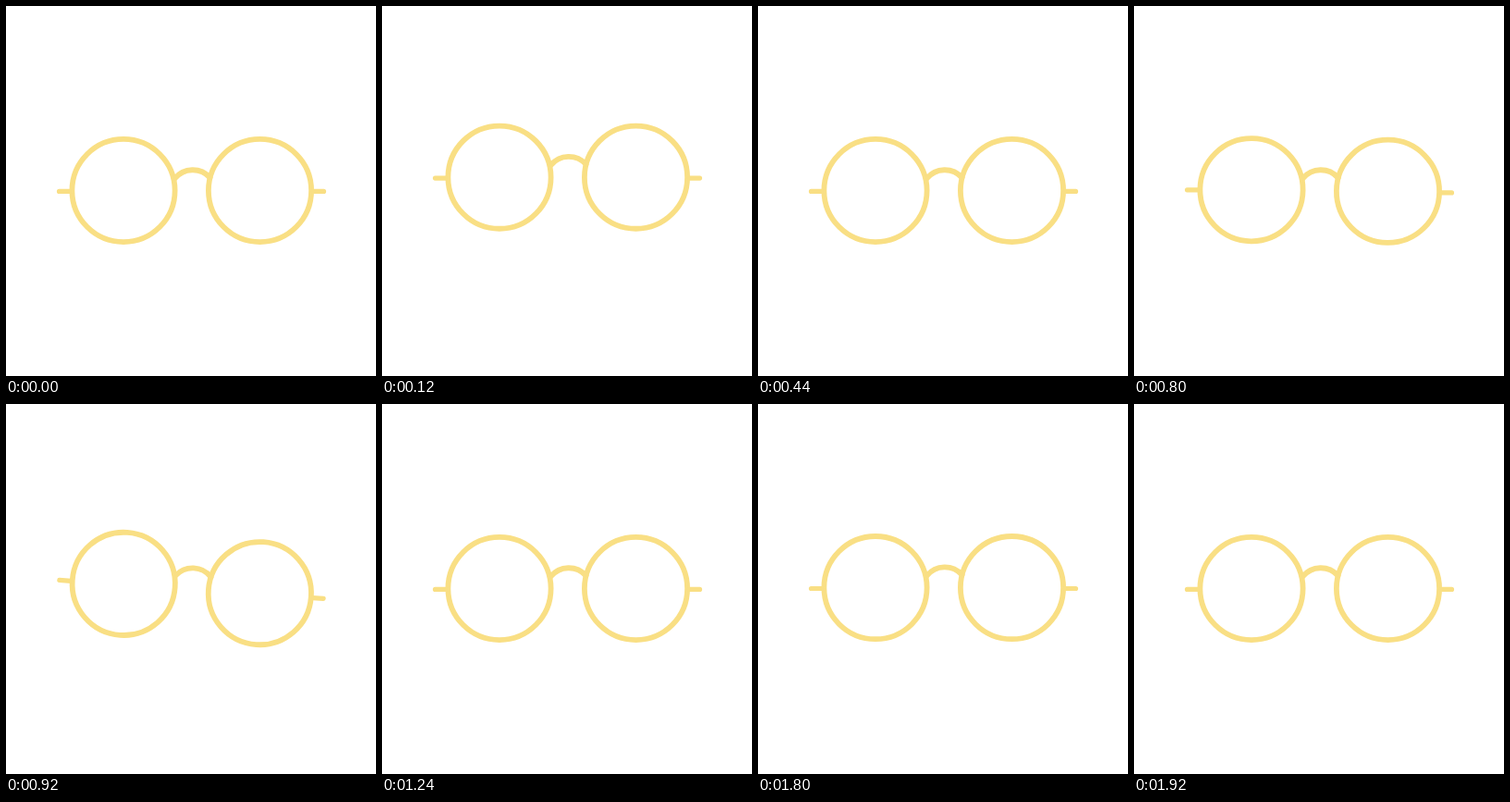
Animation, 400 px wide and 400 px high, one loop 2000 ms. Source, as an HTML page:

```html
<!DOCTYPE html>
<html lang="en">
<head>
<meta charset="utf-8">
<title>Glasses</title>
<style>
  html, body { margin: 0; width: 100%; height: 100%; overflow: hidden; background: #fff; }
  svg { display: block; width: 100%; height: 100%; }
</style>
</head>
<body>
<svg viewBox="0 0 400 400">
  <g id="glasses" fill="none" stroke="#f9df84" stroke-width="5.8" stroke-linecap="round">
    <circle cx="127" cy="199.5" r="55.6"/>
    <circle cx="274.5" cy="199.5" r="55.6"/>
    <path d="M182.5 186.5A25 25 0 0 1 220.5 185.5"/>
    <path d="M57.5 200.4H70M332 200.4H343.5" stroke-width="5.2"/>
  </g>
</svg>
<script>
const LOOP = 2000, STEP = 40;
const smooth = u => u * u * (3 - 2 * u);
const out = u => Math.sin(u * Math.PI / 2);

// [time, value, easing into this key]
const lift = [
  [0, 0], [160, -17, smooth], [320, 8, smooth], [440, 0, smooth],
  [1640, 0, smooth], [1720, 8, out], [1840, -4, smooth], [1920, 0, smooth]
];
const tilt = [[760, 0], [920, 4, smooth], [1080, 4, smooth], [1240, 0, smooth]];

function valueAt(keys, t) {
  if (t <= keys[0][0]) return keys[0][1];
  for (let i = 1; i < keys.length; i++) {
    const [t0, v0] = keys[i - 1], [t1, v1, ease] = keys[i];
    if (t <= t1) return v0 + (v1 - v0) * ease((t - t0) / (t1 - t0));
  }
  return keys[keys.length - 1][1];
}

const glasses = document.getElementById('glasses');
const start = performance.now();

function draw(now) {
  const t = Math.floor((Math.max(0, now - start) % LOOP) / STEP) * STEP;
  glasses.setAttribute('transform',
    `translate(0 ${valueAt(lift, t)}) rotate(${valueAt(tilt, t)} 200.7 200)`);
  requestAnimationFrame(draw);
}
draw(start);
</script>
</body>
</html>
```
